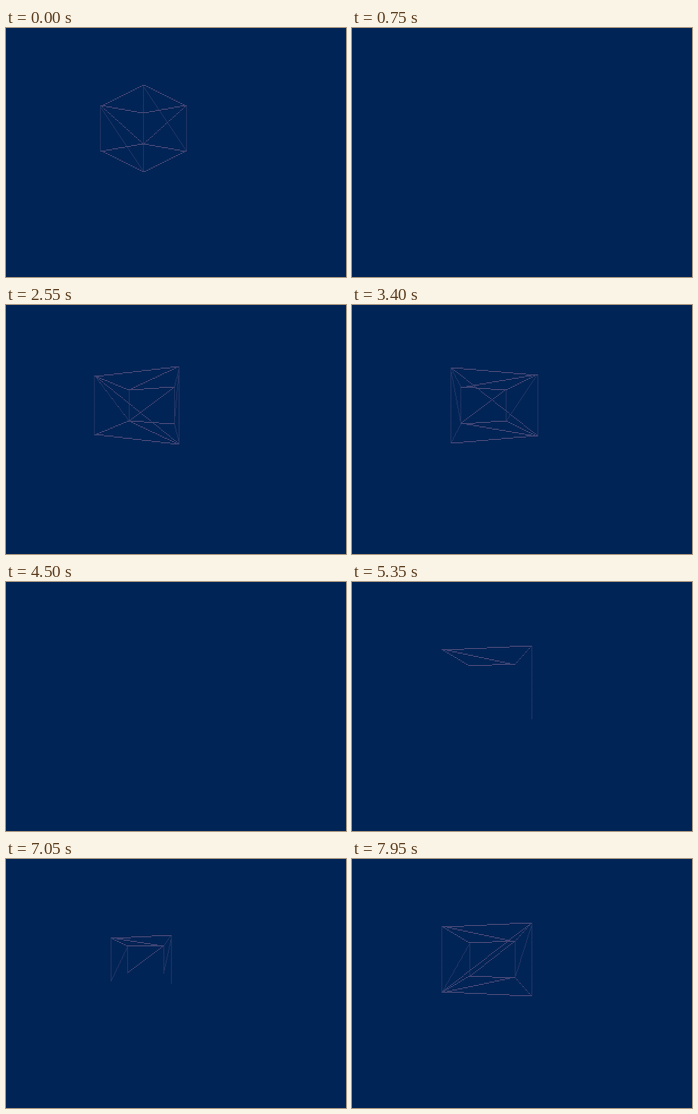
These frames come from a looping animation (600 px wide and 440 px high, 8 s). An HTML page:

```html
<!DOCTYPE html>
<html lang="en">
<head>
<meta charset="utf-8">
<title>Wireframe cube</title>
<style>
html, body { margin: 0; width: 100%; height: 100%; overflow: hidden; background: #002456; }
svg { display: block; width: 600px; height: 440px; }
</style>
</head>
<body>
<svg viewBox="0 0 600 440"><path id="wire" fill="#78628f"/></svg>
<script>
const LOOP = 8000, TICK = 50;
const FIRST = 350, PERIOD = 415.5, DRAW = 150; // redraw rhythm in ms
const CX = 242, CY = 177;                      // centre of the cube
const CELL_W = 4 / 3, CELL_H = 2;              // one cell of the coarse raster
const TRIM = 0.5;                              // each run of cells starts and ends soft
const FOCUS = 60.4;

const wire = document.getElementById("wire");
const tick = t => Math.floor(t / TICK) * TICK;

// Corners 0-3 run around the top, 4-7 lie below them.
function cubeLines() {
  const top = [], sides = [], bottom = [];
  for (let i = 0; i < 4; i++) {
    const j = (i + 1) % 4;
    top.push([i, j]);
    sides.push([i, i + 4], [Math.min(i, j), Math.max(i, j) + 4]);
    bottom.push([i + 4, j + 4]);
  }
  return [...top, [1, 3], ...sides, ...bottom, [5, 7]];
}
const lines = cubeLines();

function corners(angle, dist) {
  return Array.from({ length: 8 }, (_, i) => {
    const a = angle + (i % 4 - 1) * Math.PI / 2;
    const scale = FOCUS / (dist - Math.SQRT2 * Math.cos(a));
    return [
      Math.round(2 * Math.SQRT2 * Math.sin(a) * scale),
      Math.round(scale) * (i < 4 ? -1 : 1)
    ];
  });
}

function run(xa, xb, y) {
  const left = CX + Math.min(xa, xb) * CELL_W + TRIM / 2;
  const width = (Math.abs(xb - xa) + 1) * CELL_W - TRIM;
  return `M${left.toFixed(2)} ${CY + y * CELL_H}h${width.toFixed(2)}v1h${(-width).toFixed(2)}z`;
}

// Integer line, drawn as one horizontal run per raster row.
function rasterLine([x0, y0], [x1, y1]) {
  const dx = Math.abs(x1 - x0), dy = Math.abs(y1 - y0);
  const sx = Math.sign(x1 - x0), sy = Math.sign(y1 - y0);
  const n = Math.max(dx, dy);
  let d = "", from = x0, x = x0, y = y0;
  for (let i = 1; i <= n; i++) {
    const nextX = x0 + sx * Math.floor(i * (dx + 1) / (n + 1));
    const nextY = y0 + sy * Math.floor(i * (dy + 1) / (n + 1));
    if (nextY !== y) {
      d += run(from, x, y);
      from = nextX;
    }
    x = nextX;
    y = nextY;
  }
  return d + run(from, x, y);
}

function cube(step, share) {
  const angle = 0.25 * Math.min(9, Math.max(0, step - 4));
  const dist = step >= 16 && step <= 18 ? 4 : 3; // steps back for a while
  const p = corners(angle, dist);
  return lines.slice(0, Math.round(lines.length * share))
    .map(([a, b]) => rasterLine(p[a], p[b])).join("");
}

let shown = "";
function draw(time) {
  const t = tick(time % LOOP);
  let step = 0;
  while (t >= tick(FIRST + step * PERIOD)) step++;
  const cleared = tick(FIRST + (step - 1) * PERIOD);
  const share = step ? Math.min(1, (t - cleared) / DRAW) : 1;
  const key = step + ":" + share;
  if (key === shown) return;
  shown = key;
  wire.setAttribute("d", cube(step, share));
}

const start = performance.now();
function loop() {
  draw(performance.now() - start);
  requestAnimationFrame(loop);
}
loop();
</script>
</body>
</html>
```
